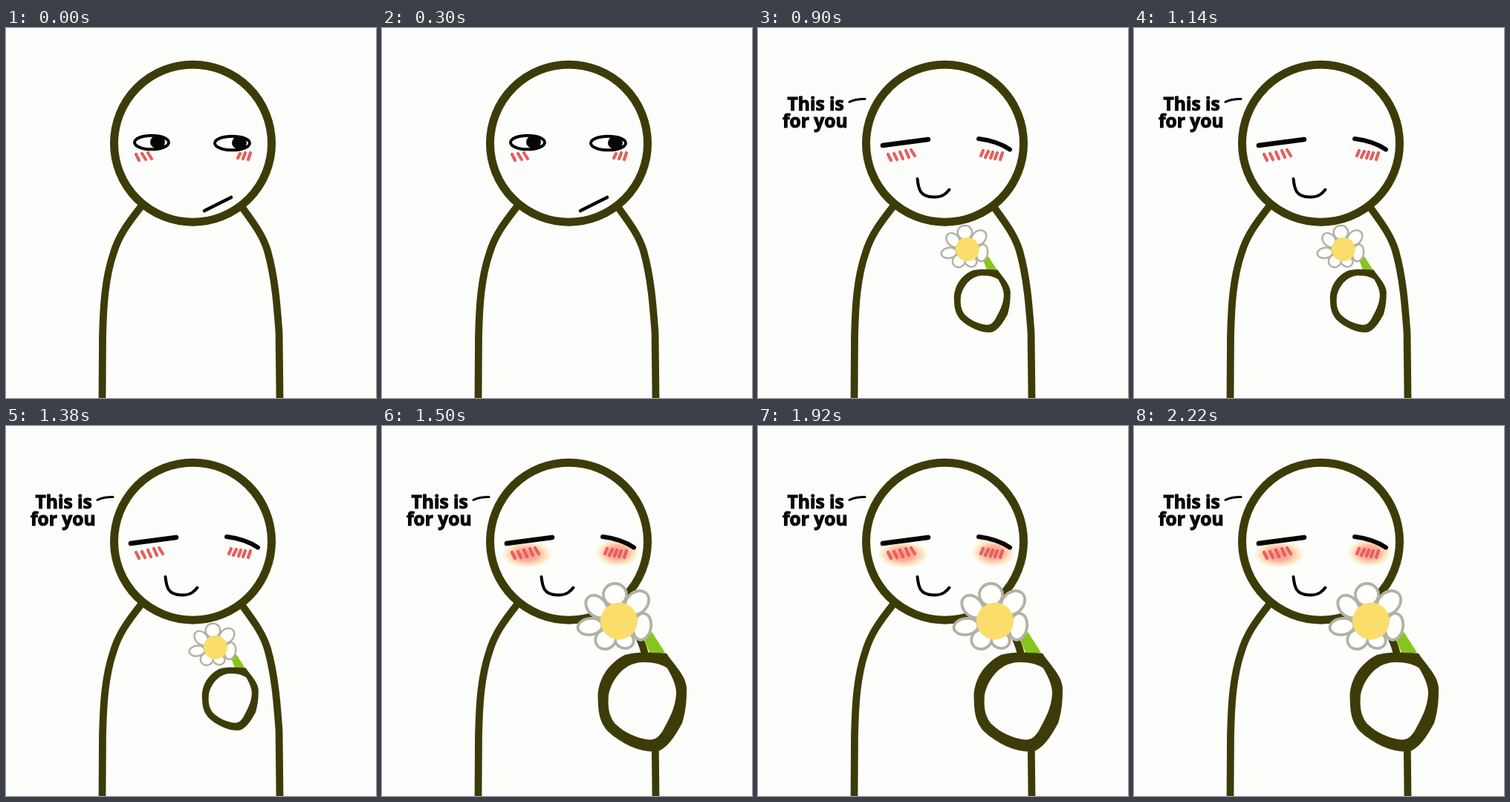
Write an HTML page that moves like this. It is 498 px wide and 498 px high and loops after 2.28 s.

```html
<!DOCTYPE html>
<html lang="en">
<head>
<meta charset="utf-8">
<title>This is for you</title>
<style>
  html, body { margin: 0; width: 100%; height: 100%; overflow: hidden; background: #fdfefc; }
  svg { display: block; width: 100vw; height: 100vh; }
  .ink { fill: none; stroke: #3d3c08; stroke-linejoin: round; }
  .pen { fill: none; stroke: #050505; stroke-linecap: round; }
  .marks { fill: none; stroke: #e65f5f; stroke-width: 4.2; stroke-linecap: round; }
  .petals { fill: #fff; stroke: #b3b1a4; stroke-width: 3.8; }
  text { font: 700 24.6px "Open Sans", "Noto Sans", sans-serif; fill: #080808;
         stroke: #080808; stroke-width: 1.1; stroke-linejoin: round; }
</style>
</head>
<body>
<svg viewBox="0 0 498 498">
  <defs>
    <radialGradient id="glow">
      <stop offset="0" stop-color="#fa9384"/>
      <stop offset=".45" stop-color="#fbad9a" stop-opacity=".95"/>
      <stop offset=".75" stop-color="#fde0b2" stop-opacity=".75"/>
      <stop offset="1" stop-color="#fdf5d4" stop-opacity="0"/>
    </radialGradient>
  </defs>

  <g class="ink" stroke-width="9.8">
    <path d="M182 240C164 263 152 279 145 302C133 337 131 375 130 415L129.500 498"/>
    <path d="M319 243C335 265 346 280 352 300C362 335 365 375 367.500 410L368.500 498"/>
    <circle cx="251.500" cy="155.200" r="106" stroke-width="11"/>
  </g>

  <g id="shy">
    <g class="pen" stroke-width="4">
      <ellipse cx="196" cy="154" rx="23" ry="9.3"/>
      <ellipse cx="304.500" cy="155" rx="23.500" ry="9.3"/>
      <path d="M267 246L303 228" stroke-width="4.6"/>
    </g>
    <g id="pupils" fill="#050505">
      <ellipse cx="204" cy="154" rx="10" ry="9"/>
      <ellipse cx="314" cy="155" rx="10" ry="9"/>
    </g>
    <path class="marks" d="M175 170L179 178M183 169L188 177M191 168L196 176M312 175L315 169M319 176L322 168M326 177L329 168"/>
  </g>

  <g id="happy">
    <g id="blush" fill="url(#glow)">
      <ellipse cx="195" cy="173" rx="36" ry="19"/>
      <ellipse cx="317" cy="170.500" rx="31" ry="20"/>
    </g>
    <path class="marks" d="M175 170L179 178M183 169L187 177M191 167L195 176M199 165L203 174M206 164L211 172M300 172L303 165M306 174L310 166M313 175L316 167M319 176L322 168M326 177L329 168"/>
    <g class="pen">
      <path d="M168 158L229 150" stroke-width="6.6"/>
      <path d="M297 149Q322 152 339 163.500" stroke-width="6"/>
      <path d="M214.500 203C216 217 218 227 236 227.500C249 228 254 222 257.500 217.500" stroke-width="4"/>
      <path d="M123 99.500Q131 95.500 144 95.500" stroke-width="3"/>
    </g>
    <text x="39.500" y="111">This is</text>
    <text x="33" y="134">for you</text>

    <g id="gift">
      <path d="M353 287L363 277L381 305L361 308Z" fill="#86c61c"/>
      <g class="petals" id="petals"></g>
      <circle cx="319" cy="262.500" r="25" fill="#fadd6b"/>
      <path fill="#3d3c08" d="M327 308C345 303 365 305 383 306C390 318 409 335 410 352C410 365 410 380 404 400C397 412 387 432 371 438C350 440 325 430 304 411C292 397 291 385 290.500 362C292 340 304 320 327 308Z"/>
      <path fill="#fdfefc" d="M345 318.500C362 317 375 320 384 326C392 340 396 350 396 360C395 380 386 395 378 410C372 420 366 423 358 422C342 420 325 412 313 400C304 388 304 375 305 362C308 345 322 322 345 318.500Z"/>
    </g>
  </g>
</svg>
<script>
  const LOOP = 2280;
  const $ = id => document.getElementById(id);

  // cx, cy, rx, ry, tilt
  const petals = [
    [326, 288, 13, 11, 20], [301, 287, 14, 13, -35], [280, 270, 16.5, 11, -8],
    [289, 243, 17, 12.5, 48], [343, 238, 18, 14, -45], [350, 270, 12, 18, 10],
    [313.5, 227, 15.5, 15, 0]
  ];
  $("petals").innerHTML = petals.map(([x, y, rx, ry, a]) =>
    `<ellipse cx="${x}" cy="${y}" rx="${rx}" ry="${ry}" transform="rotate(${a} ${x} ${y})"/>`).join("");

  const small = "translate(79 131) scale(.636)";
  const steps = [
    { at: 0, look: 0 },
    { at: 600, look: -17 },
    { at: 900, happy: true, gift: small },
    { at: 1500, happy: true, gift: "", glow: true }
  ];
  const show = (id, on) => $(id).setAttribute("visibility", on ? "inherit" : "hidden");

  let current;
  function draw(now) {
    const t = now % LOOP;
    const s = steps.filter(step => step.at <= t).pop();
    if (s !== current) {
      current = s;
      show("shy", !s.happy);
      show("happy", s.happy);
      show("blush", s.glow);
      $("pupils").setAttribute("transform", `translate(${s.look || 0} -.5)`);
      $("gift").setAttribute("transform", s.gift || "");
    }
  }

  const start = performance.now();
  function tick(now) {
    draw(Math.max(0, now - start));
    requestAnimationFrame(tick);
  }
  tick(start);
</script>
</body>
</html>
```
